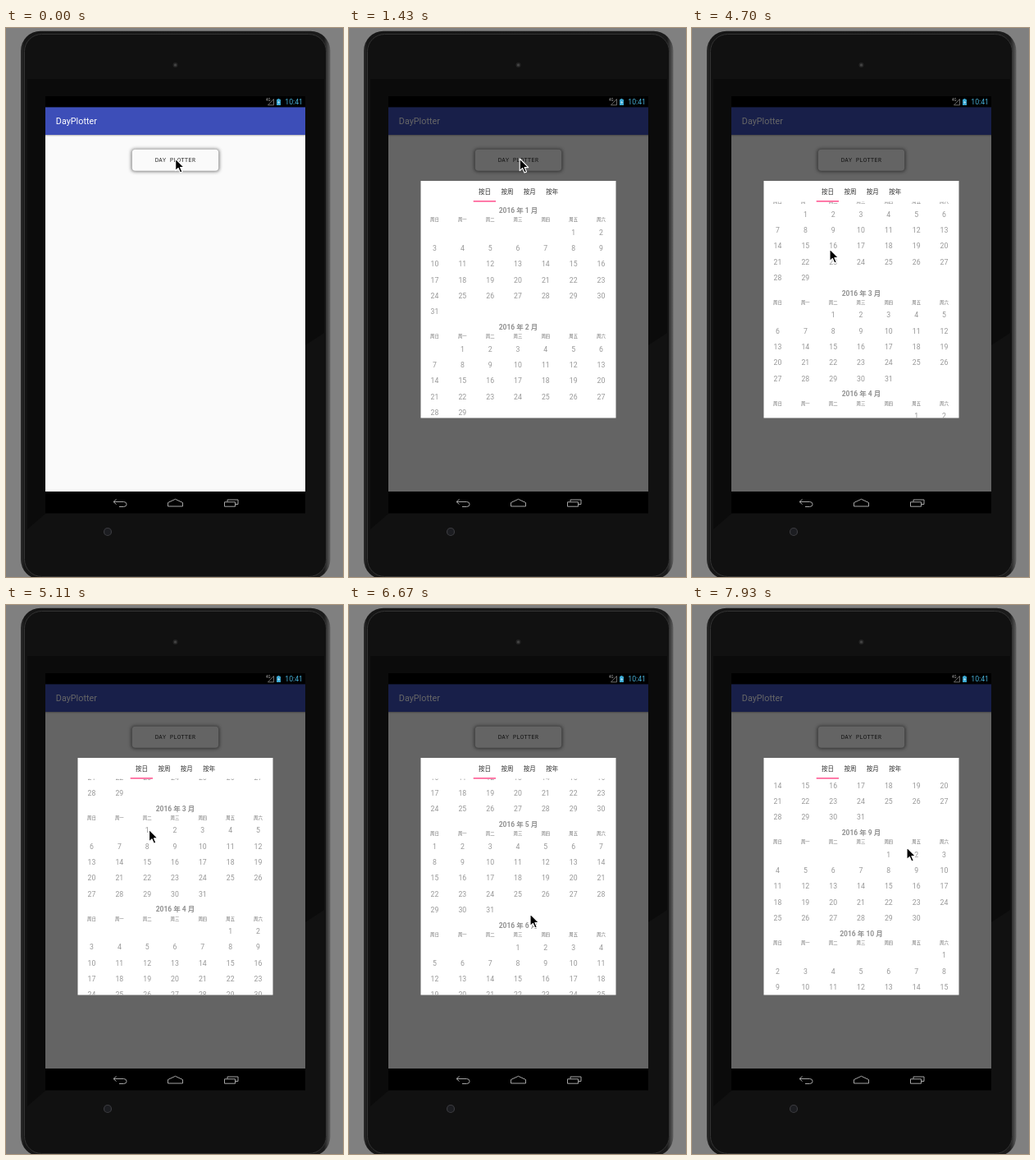
An HTML page that plays this animation: 411 px wide and 668 px high, repeating every 8000 ms.

```html
<!DOCTYPE html>
<html lang="zh">
<head>
<meta charset="utf-8">
<title>Calendar dialog</title>
<style>
  html, body { margin: 0; width: 100%; height: 100%; overflow: hidden; background: #808080; }
  svg { display: block; width: 411px; height: 668px; }
  text { font-family: Roboto, "Noto Sans CJK SC", "Noto Sans CJK", sans-serif; }
  .mid { text-anchor: middle; }
  .month { font-size: 8.5px; font-weight: 700; fill: #929292; }
  .week { font-size: 5.4px; fill: #6c6c6c; }
  .day { font-size: 8.7px; fill: #979797; }
  .tab { font-size: 7.5px; fill: #2c2c2c; }
  .nav { fill: none; stroke: #a4a4a4; stroke-linejoin: round; }
</style>
</head>
<body>
<svg viewBox="0 0 411 668">
  <defs>
    <linearGradient id="rim">
      <stop offset="0" stop-color="#2c2c2c"/>
      <stop offset=".012" stop-color="#161616"/>
      <stop offset=".98" stop-color="#1b1b1b"/>
      <stop offset="1" stop-color="#606060"/>
    </linearGradient>
    <filter id="blur" x="-20%" y="-50%" width="140%" height="200%">
      <feGaussianBlur stdDeviation="2.2"/>
    </filter>
    <clipPath id="list"><rect x="88" y="211.5" width="237" height="263"/></clipPath>
  </defs>

  <!-- tablet -->
  <rect width="411" height="668" fill="#808080"/>
  <rect x="18" y="3.7" width="377.5" height="667" rx="24" fill="url(#rim)"/>
  <rect x="22.5" y="7.5" width="368" height="660" rx="21" fill="#111" stroke="#333"/>
  <path d="M26 62H388V371L48 591L26 610Z" fill="#0b0b0b"/>
  <circle cx="206.5" cy="45" r="3" fill="#252525"/>
  <circle cx="206.5" cy="45" r="1.6" fill="#444"/>
  <circle cx="124" cy="613" r="4.5" fill="#1c1d21" stroke="#3b3b3f" stroke-width="1.2"/>

  <!-- screen -->
  <rect x="48" y="83" width="317" height="507.5" fill="#000"/>
  <text x="317" y="89.3" font-size="4.5" fill="#aaa">4G</text>
  <path d="M319.5 93.8H326.5V86.5Z" fill="none" stroke="#777" stroke-width=".9"/>
  <path d="M330 87H331.2V86H333.6V87H335V94H330Z" fill="#39a5cf"/>
  <path d="M332.9 88L331.3 90.7H332.5L332 93L333.9 90H332.6Z" fill="#d9f2fc"/>
  <text x="340.3" y="93" font-size="8.7" fill="#46aed5">10:41</text>

  <rect x="48" y="130" width="317" height="434" fill="#fafafa"/>
  <rect x="48" y="130" width="317" height="1" fill="#c5c5c5"/>
  <rect x="48" y="131" width="317" height="1" fill="#e8e8e8"/>
  <rect x="48" y="96.4" width="317" height="33.6" fill="#3d4eb8"/>
  <text x="60.8" y="117.3" font-size="10.8" fill="#fff">DayPlotter</text>
  <rect x="153" y="147.5" width="107" height="27" rx="4" fill="#444" opacity=".8" filter="url(#blur)"/>
  <rect x="153.8" y="147.7" width="105.4" height="26" rx="4" fill="#fafafa"/>
  <text class="mid" x="206.5" y="163.2" fill="#333" style="font:7.5px 'Noto Sans Mono', 'DejaVu Sans Mono', monospace">DAY PLOTTER</text>

  <path class="nav" d="M134.5 573.5L131 576.5L134.5 579.5M131 576.5H143.5Q147 576.5 147 579.5T143.5 582.5H138"/>
  <path class="nav" d="M197.5 582V577.5L206.5 573.3L215.5 577.5V582Z"/>
  <path class="nav" d="M266.5 576.8H279.5V582.2H266.5ZM270 576.5V574H283V579.5H280"/>

  <!-- dialog -->
  <rect id="dim" x="48" y="96" width="317" height="468" fill="#000"/>
  <g id="dialog">
    <rect x="87.5" y="186" width="238" height="288.5" fill="#fff"/>
    <g clip-path="url(#list)"><g id="months"></g></g>
    <g id="tabs"></g>
    <rect x="151.7" y="210" width="27.3" height="1.6" fill="#ff5a93"/>
  </g>

  <path id="cursor" d="M0 0V14.6L3.4 11.5L5.8 17L8.3 15.9L5.9 10.6H10.5Z" fill="#000" stroke="#fff" stroke-width="1.1" stroke-linejoin="round"/>
</svg>

<script>
const LOOP = 8000, ROW = 19.3, COL = 33.83;
const $ = id => document.getElementById(id);

function addText(parent, cls, x, y, str) {
  const el = document.createElementNS("http://www.w3.org/2000/svg", "text");
  el.setAttribute("class", "mid " + cls);
  el.setAttribute("x", x);
  el.setAttribute("y", y);
  el.textContent = str;
  parent.append(el);
}

const colX = i => 104.5 + COL * i;

// Draws one month and returns its height.
function addMonth(year, month, top) {
  const box = $("months");
  const first = new Date(year, month, 1).getDay();
  const days = new Date(year, month + 1, 0).getDate();
  addText(box, "month", 206.5, top + 3.1, `${year} 年 ${month + 1} 月`);
  [..."日一二三四五六"].forEach((c, i) => addText(box, "week", colX(i), top + 13.3, "周" + c));
  for (let d = 1; d <= days; d++) {
    const cell = first + d - 1;
    addText(box, "day", colX(cell % 7), top + 29.8 + ROW * Math.floor(cell / 7), d);
  }
  return 26.2 + ROW * Math.ceil((first + days) / 7);
}

let nextTop = 222;
for (let m = 0; m < 12; m++) nextTop += addMonth(2016, m, nextTop);
[..."日周月年"].forEach((c, i) => addText($("tabs"), "tab", 165.5 + 27.4 * i, 201.9, "按" + c));

const progress = (t, from, to) => Math.min(1, Math.max(0, (t - from) / (to - from)));
const smooth = u => u * u * (3 - 2 * u);

// A swipe that slows down, then one that gathers speed.
function scrollAt(t) {
  const slowing = 1 - (1 - progress(t, 4050, 5630)) ** 1.58;
  const gaining = progress(t, 5990, 7930) ** 1.285;
  return 288.9 * slowing + 676.3 * gaining;
}

// Pointer moves after its rest on the button.
const rest = { x: 206.7, y: 159 };
const moves = [
  { from: 1400, to: 1550, x: 220.5, y: 159 },
  { from: 1850, to: 2210, x: 178.5, y: 300 },
  { from: 2440, to: 2970, x: 174.5, y: 308.5 },
  { from: 4050, to: 4700, x: 168, y: 269 },
  { from: 4880, to: 5630, x: 197, y: 288 },
  { from: 5630, to: 5800, x: 217, y: 357 },
  { from: 5990, to: 6670, x: 221, y: 376 },
  { from: 6790, to: 7930, x: 262, y: 295 }
];

function cursorAt(t) {
  return moves.reduce((p, m) => {
    const u = smooth(progress(t, m.from, m.to));
    return { x: p.x + (m.x - p.x) * u, y: p.y + (m.y - p.y) * u };
  }, rest);
}

function draw(t) {
  // The dialog opens in three hard steps.
  const shown = t < 620 ? 0 : Math.min(3, 1 + Math.floor((t - 620) / 90)) / 3;
  const scale = 0.95 + 0.05 * shown;
  const { x, y } = cursorAt(t);
  $("dim").setAttribute("opacity", 0.6 * shown);
  $("dialog").setAttribute("opacity", shown);
  $("dialog").setAttribute("transform", `translate(206.5 330) scale(${scale}) translate(-206.5 -330)`);
  $("months").setAttribute("transform", `translate(0 ${-scrollAt(t)})`);
  $("cursor").setAttribute("transform", `translate(${x} ${y})`);
}

const start = performance.now();
function tick() {
  draw((performance.now() - start) % LOOP);
  requestAnimationFrame(tick);
}
tick();
</script>
</body>
</html>
```
